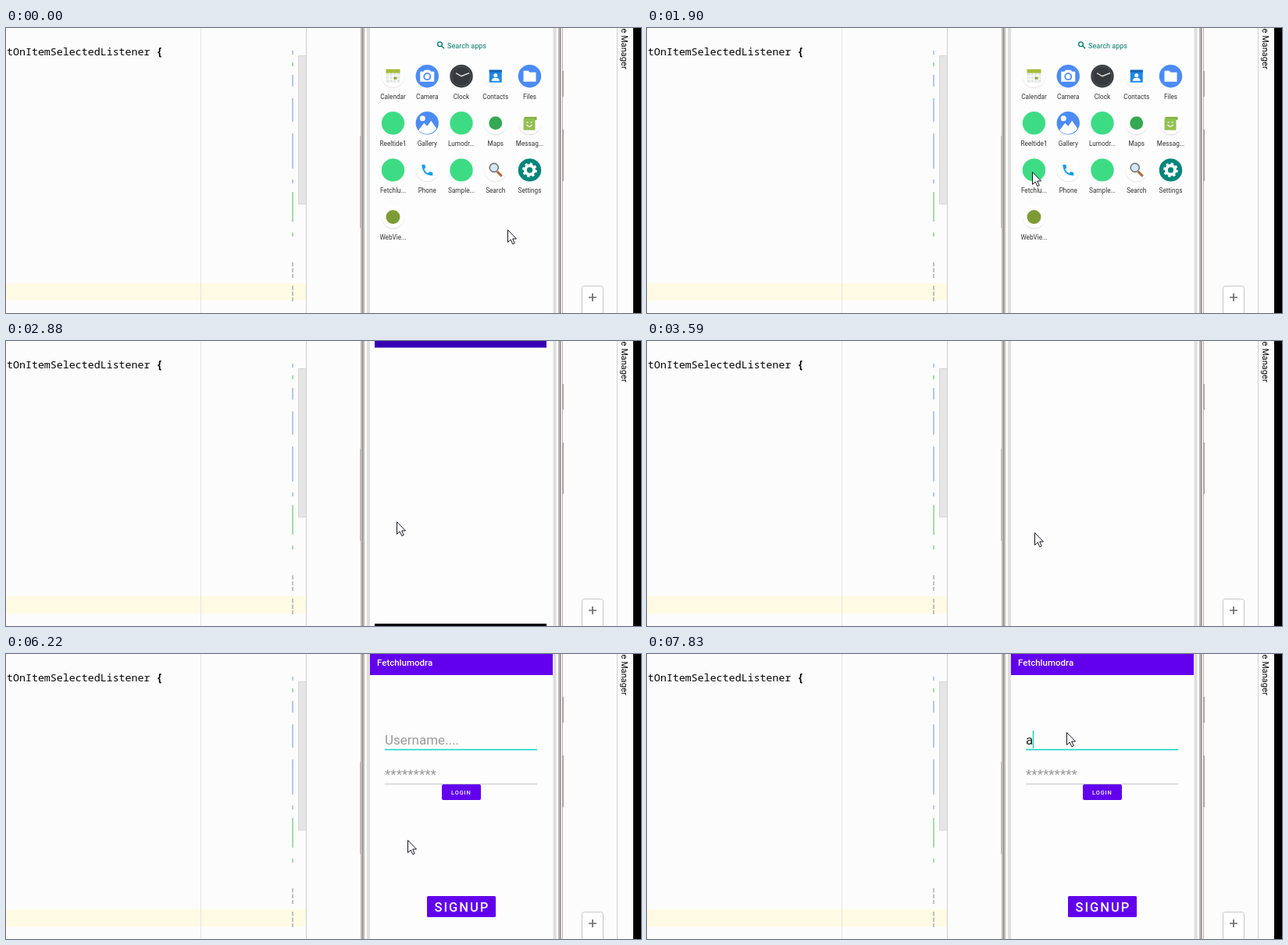
Recreate the animation shown at these times as an HTML page. Size 813 px wide and 365 px high, loop 7.99 s.

```html
<!DOCTYPE html>
<html lang="en">
<head>
<meta charset="utf-8">
<style>
html, body { margin: 0; width: 100%; height: 100%; overflow: hidden; background: #fcfcfc; }
svg { display: block; width: 813px; height: 365px; font-family: Roboto, sans-serif; }
.code { font: 13.3px "Noto Sans Mono", monospace; white-space: pre; }
.label { font-size: 8.2px; text-anchor: middle; fill: #333; }
.hint { font-size: 17px; fill: #9a9a9a; }
.button { fill: #fff; font-weight: 500; }
</style>
</head>
<body>
<svg viewBox="0 0 813 365">
  <!-- editor -->
  <path fill="#fffae3" d="M0 327h384v22H0z"/>
  <path stroke="#e4e4e4" d="M249.5 0v365"/>
  <text class="code" x="1" y="35">tOnItemSelectedListener <tspan font-weight="700">{</tspan></text>
  <path fill="#e5e5e5" stroke="#d6d6d6" d="M374.5 35.5h10v190h-10z"/>
  <path stroke="#cfcfcf" d="M384.5 0v365M782.5 0v365"/>
  <g stroke-width="2">
    <path stroke="#b4c8ef" d="M367 29v5m0 26v15m0 15v30m0 15v45m0 14v5"/>
    <path stroke="#a6dba8" d="M367 44v5m0 161v38m0 14v5"/>
    <path stroke="#c0c0c0" stroke-dasharray="5.5 2" d="M367 300v20m0 10v20"/>
  </g>

  <!-- phone -->
  <path fill="#fdfdfd" d="M466 0h234v365H466z"/>
  <path stroke="#dedede" stroke-width="4" d="M464 0v365M702.5 0v365"/>
  <path stroke="#b9b3b3" d="M454.5 0v365M458.5 0v365M707.5 0v365M712.5 0v365"/>
  <path stroke="#8d8585" stroke-width="2" d="M456.5 0v365M709.5 0v365"/>
  <path stroke="#c9bfbf" d="M453.5 138v118"/>
  <path stroke="#aaa4a4" stroke-width="2" d="M713 55v33m0 42v66"/>

  <!-- side strip -->
  <path d="M803 0h10v365h-10z"/>
  <text transform="translate(787.5 53)rotate(90)" text-anchor="end" font-family="Inter, sans-serif" font-size="10.4">Device Manager</text>
  <rect x="737.5" y="330.5" width="27" height="40" rx="3" fill="#fff" stroke="#c6c6c6"/>
  <path stroke="#6c6c6c" stroke-width="1.7" d="M746 345h10m-5-5v10"/>

  <g id="drawer">
    <g fill="none" stroke="#00796b" stroke-width="1.3"><circle cx="555.5" cy="20.8" r="2.9"/><path d="M557.7 23l3.4 3.2"/></g>
    <text x="565" y="25.5" font-size="9.1" fill="#00796b">Search apps</text>
  </g>

  <g id="opening">
    <path fill="#fdfdfd" d="M472 0h220v365H472z"/>
    <path fill="#3700b3" d="M472 0h220v8.5H472z"/>
    <path d="M472 362h220v3H472z"/>
  </g>

  <g id="login">
    <path fill="#6200ee" d="M466 0h234v27H466z"/>
    <text x="475" y="15" font-size="11.5" font-weight="500" fill="#fff">Fetchlumodra</text>
    <text id="user" class="hint" x="485" y="116"></text>
    <path stroke="#0cd3c4" stroke-width="1.4" d="M485 122.5h195"/>
    <path id="caret" stroke="#0cd3c4" stroke-width="1.4" d="M0 98v23"/>
    <text class="hint" x="485" y="160">*********</text>
    <path stroke="#c6c6c6" d="M485 166.5h195"/>
    <rect x="558" y="167" width="50" height="20" rx="2" fill="#6200ee"/>
    <text class="button" x="570" y="180" font-size="7.4" letter-spacing=".9">LOGIN</text>
    <rect x="539" y="310" width="88" height="27" rx="1.5" fill="#6200ee"/>
    <text class="button" x="548.5" y="330" font-size="16.5" letter-spacing="2">SIGNUP</text>
  </g>

  <path id="pointer" fill="#fff" stroke="#15151f" d="M.5.6V16.4L4.2 13l2.6 5.6 2.4-1L6.7 12h4.8z"/>
</svg>
<script>
const $ = id => document.getElementById(id);
const disc = (color, inner = "") => `<circle r="14.7" fill="${color}"/>${inner}`;
const plate = inner =>
  `<circle cy=".8" r="14.6" fill="#dcdcdc"/><circle r="14.5" fill="#fff"/>${inner}`;
const app = disc("#3ddc84");

const icons = [
  ["Calendar", plate(`<path fill="#e3e6e3" d="M-9-8H9V8H-9z"/><path fill="#a8bd3a" d="M-9-9H9v5H-9z"/>
    <path stroke="#fff" d="M-9 0H9M-9 4H9M-4.5-4V8M0-4V8M4.5-4V8"/><path fill="#8fa62f" d="M1 1h4v3H1z"/>`)],
  ["Camera", disc("#4c8bf5", `<path fill="#fff" d="M-9-6h4l2-2h6l2 2h4V7H-9z"/>
    <circle r="4" cy=".5" fill="#fff" stroke="#4c8bf5" stroke-width="1.8"/>`)],
  ["Clock", disc("#38393e", `<circle r="12.5" fill="none" stroke="#55565b"/>
    <path fill="none" stroke="#eee" stroke-width="1.3" d="M-7-4L0 0L10-4"/>`)],
  ["Contacts", plate(`<path fill="#1e88e5" d="M-8-8H8V8H-8z"/><path fill="#1565b5" d="M-8-8H8v3H-8z"/>
    <circle cy="-1" r="2.5" fill="#fff"/><path fill="#fff" d="M-5 6q0-4 5-4t5 4z"/>`)],
  ["Files", disc("#4c8bf5", `<path fill="#fff" d="M-8-7h6l2 2h8V7H-8z"/>`)],
  ["Reeltide1", app],
  ["Gallery", disc("#4c8bf5", `<circle cx="-6" cy="-6" r="3.5" fill="#fff"/>
    <path fill="#fff" d="M-11 9L-4 0L0 4L5-3L12 7Q7 14 0 14Q-7 14-11 9z"/>`)],
  ["Lumodr...", app],
  ["Maps", plate(`<circle r="8.5" fill="#34a853"/>`)],
  ["Messag...", plate(`<path fill="#7fae42" d="M-7-8H9v4H-7z"/><path fill="#93c054" d="M-8-6H7V9H-8z"/>
    <path fill="none" stroke="#fff" stroke-width="1.3" d="M-4 2q3.5 5 7 0M-4-1h2M1-1h2"/>`)],
  ["Fetchlu...", app],
  ["Phone", plate(`<path fill="#129eee" d="M-7-7h4l1 4-2 2q2 4 5 5l2-2 4 1v4q-13 0-14-14z"/>`)],
  ["Sample...", app],
  ["Search", plate(`<path stroke="#b06a3c" stroke-width="3" d="M2 2L8 8"/>
    <circle cx="-2" cy="-3" r="5.5" fill="#d5e9f5" stroke="#777" stroke-width="1.6"/>`)],
  ["Settings", disc("#00857a", `<circle r="5.6" fill="none" stroke="#fff" stroke-width="4"/>
    <circle r="8.2" fill="none" stroke="#fff" stroke-width="2.4" stroke-dasharray="3.22"/>`)],
  ["WebVie...", plate(`<circle r="9" fill="#7d9b35"/>`)]
];

$("drawer").innerHTML += icons.map(([name, art], i) => {
  const x = 495.5 + i % 5 * 43.75, y = 61.7 + Math.floor(i / 5) * 60.1;
  return `<g transform="translate(${x} ${y})"><g class="icon">${art}</g>
    <text class="label" y="29.3">${name}</text></g>`;
}).join("");
const pressed = document.querySelectorAll(".icon")[10];

// time, x, y of the pointer tip; it jumps from place to place
const moves = [
  [0, 642, 258], [150, 637, 249], [280, 627, 231], [420, 626, 226], [570, 623, 219],
  [690, 619, 206], [810, 615, 192], [930, 606, 168], [1050, 598, 150], [1200, 594, 140],
  [1320, 592, 135], [1480, 589, 133], [1630, 519, 179], [1780, 500, 182], [1900, 493, 184],
  [2760, 496, 205], [2880, 500, 231], [3000, 500, 232], [3590, 496, 245], [3740, 495, 248],
  [4170, 499, 249], [4570, 504, 249], [6220, 514, 238], [6340, 512, 343], [6590, 533, 311],
  [6740, 549, 132], [6890, 541, 90], [7020, 538, 110], [7160, 537, 100]
];
const show = (el, on) => el.style.display = on ? "" : "none";
const within = (t, from, to) => t >= from && t < to;

function draw() {
  const t = performance.now() % 7990;
  const [, x, y] = moves.findLast(m => m[0] <= t);
  $("pointer").setAttribute("transform", `translate(${x} ${y})`);

  show($("drawer"), t < 2880);
  pressed.setAttribute("transform", `scale(${within(t, 2490, 2610) ? 1.05 : 1})`);

  show($("opening"), within(t, 2760, 3000));
  $("opening").setAttribute("transform", t < 2880 ? "translate(216 76)scale(.6)" : "");

  const typed = t >= 7830;
  show($("login"), t >= 6220);
  $("user").textContent = typed ? "a" : "Username....";
  $("user").style.fill = typed ? "#222" : "";
  show($("caret"), within(t, 6740, 7160) || t >= 7710);
  $("caret").setAttribute("transform", `translate(${typed ? 494.5 : 485.7})`);
  requestAnimationFrame(draw);
}
draw();
</script>
</body>
</html>
```
